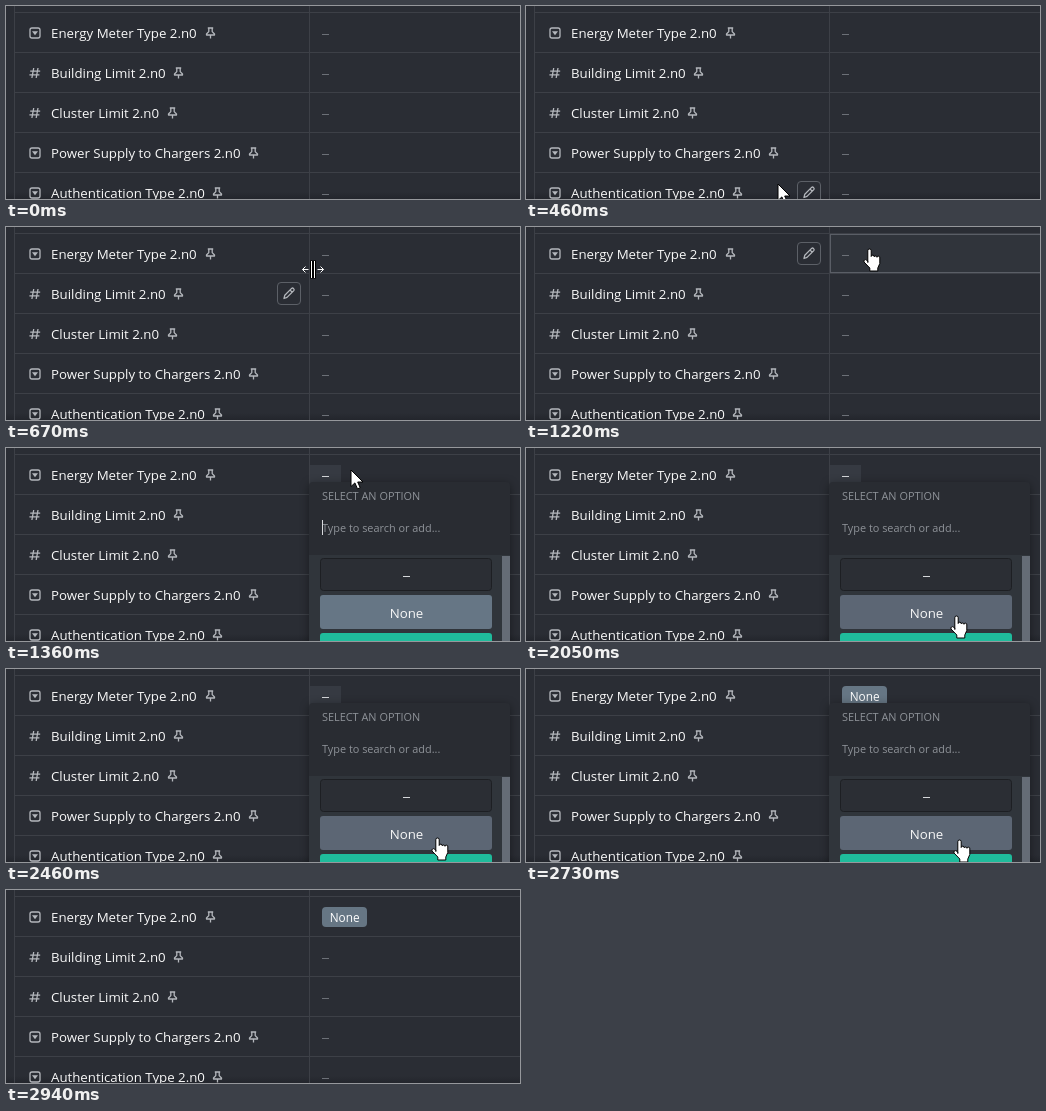
Recreate the animation shown at these times as an HTML page. Size 514x193 px, loop 4020 ms.

```html
<!DOCTYPE html>
<html lang="en">
<head>
<meta charset="utf-8">
<style>
  html, body { margin: 0; width: 100%; height: 100%; overflow: hidden; background: #2a2d34; }
  svg { display: block; width: 514px; height: 193px; }
  text { font: 13.27px "Open Sans", "Noto Sans", sans-serif; fill: #f8f8f8; }
  .small { font-size: 10.9px; fill: #8e9298; }
  .line { stroke: #3d4047; fill: none; }
  .icon { stroke: #b4b7bc; fill: none; stroke-width: 1.3; stroke-linejoin: round; }
  .dash { stroke: #6c7077; }
  .cursor { fill: #fff; stroke: #000; stroke-linejoin: round; }
  #popup { filter: drop-shadow(0 2px 5px rgba(0, 0, 0, .4)); }
</style>
</head>
<body>
<svg id="stage" viewBox="0 0 514 193">
  <defs>
    <linearGradient id="fade" x2="0" y2="1">
      <stop stop-color="#1c1e24" stop-opacity="0"/>
      <stop offset="1" stop-color="#1c1e24" stop-opacity=".5"/>
    </linearGradient>
  </defs>
  <rect y="186" width="514" height="7" fill="url(#fade)"/>
  <g id="table"></g>

  <g id="hover">
    <rect id="valueHover" x="304.5" y=".5" width="215" height="38" fill="#30343b" stroke="#5a5e66"/>
    <path id="hoverDash" class="dash" d="M316 21.5h7"/>
    <rect x="271.5" y="8.5" width="23" height="22" rx="3.5" fill="none" stroke="#5c6067"/>
    <path class="icon" d="M278 24.5l.8-3.3 6.8-6.8q1-.8 2 .2t.2 2l-6.8 6.8zM284 16l2.4 2.4"/>
  </g>

  <g id="activeCell">
    <rect x="304" y="17" width="31" height="20" fill="#363a42"/>
    <path d="M316 28.5h7" stroke="#d5d7da"/>
  </g>
  <g id="pill">
    <rect x="316" y="17" width="45" height="20" rx="4" fill="#667684"/>
    <text x="323.7" y="31.5" style="font-size:11.8px;font-weight:500;fill:#fff">None</text>
  </g>

  <g id="popup">
    <rect x="303" y="34" width="201" height="170" rx="4" fill="#292c32"/>
    <rect x="303" y="107" width="201" height="90" fill="#30353b"/>
    <rect x="496" y="108" width="8" height="90" fill="#656c76"/>
    <text class="small" x="316" y="52">SELECT AN OPTION</text>
    <text class="small" x="316" y="84">Type to search or add...</text>
    <path id="caret" d="M316.5 72v15" stroke="#d8dadd"/>
    <rect id="optionEmpty" x="314.5" y="110.5" width="171" height="32" rx="3" stroke="#1d1f23"/>
    <path d="M397 128.5h7" stroke="#d5d7da"/>
    <rect id="optionNone" x="314" y="147" width="172" height="34" rx="3"/>
    <text x="400.5" y="170" text-anchor="middle">None</text>
    <rect x="314" y="185" width="172" height="20" rx="3" fill="#1fbc9c"/>
  </g>

  <g id="cursor">
    <path id="arrow" class="cursor" d="M0 0V16.5l3.9-3.6 2.6 6 2.7-1.2-2.5-5.7H12z"/>
    <path id="hand" class="cursor" transform="translate(-8.2 -.5)" d="M5 14V2.2a1.7 1.7 0 0 1 3.4 0V8a1.5 1.5 0 0 1 3 .3a1.5 1.5 0 0 1 2.8.5a1.4 1.4 0 0 1 2.8.6V15l-2 4.5v3H7v-3L1.2 13.5a1.7 1.7 0 0 1 2.6-2L5 13z"/>
    <g id="resize" fill="none">
      <path d="M-.5-8.5v18M2.5-8.5v18" stroke="#000" stroke-width="3"/>
      <path d="M-.5-8v17M2.5-8v17M-9.5.5h6M5.5.5h6M-6.5-2.5l-3 3 3 3M8.5-2.5l3 3-3 3" stroke="#fff"/>
    </g>
  </g>
</svg>
<script>
const LOOP = 4020, ROW = 40, TOP = 7;
const OPEN = 1290, PICKED = 2600, CLOSED = 2800, LEAVE = 2940;
const HOVER_LAG = 60;
const $ = id => document.getElementById(id);
const show = (id, on) => $(id).style.display = on ? "" : "none";

const rows = [
  ["Energy Meter Type 2.n0", "select", 204.5],
  ["Building Limit 2.n0", "number", 172.5],
  ["Cluster Limit 2.n0", "number", 166.5],
  ["Power Supply to Chargers 2.n0", "select", 247.5],
  ["Authentication Type 2.n0", "select", 211.5]
];
const icons = {
  select: `<rect class="icon" x="24" y="15" width="10" height="10" rx="2"/>
    <path d="M26 18.3h6l-3 4z" fill="#b4b7bc"/>`,
  number: `<path class="icon" d="M27.7 15l-1.8 10M32 15l-1.8 10M24.2 18.2h10M23.4 21.8h10"/>`
};
const pin = "M-2.7-5h5.4M-1.7-5v3.6L-4 1v1h8v-1L1.7-1.4v-3.6M0 2v3.5";

$("table").innerHTML = rows.map(([label, type, pinX], i) => `
  <g transform="translate(0 ${TOP + i * ROW})">
    <path class="line" d="M8-.5h506"/>
    ${icons[type]}
    <text x="45" y="25">${label}</text>
    <path class="icon" transform="translate(${pinX} 20)" d="${pin}"/>
    <path class="dash" ${i ? "" : 'id="firstDash"'} d="M316 21.5h7"/>
  </g>`).join("") + `<path class="line" d="M8.5 0v193M303.5 0v193"/>`;

// Pointer moves: start time, end time, number of steps, from, to
const moves = [
  [400, 670, 4, [252, 178], [306, 42]],
  [670, 820, 2, [306, 42], [345, 24]],
  [1025, 1220, 3, [345, 24], [345, 22]],
  [1560, 2050, 7, [346, 22], [432, 168]],
  [2320, 2730, 6, [432, 168], [435, 171]],
  [2730, 2870, 2, [435, 171], [437, 180]]
];

function pointerAt(t) {
  if (t < moves[0][0] || t >= LEAVE) return null;
  const [start, end, steps, from, to] = moves.filter(m => m[0] <= t).pop();
  const p = Math.min(1, Math.floor((t - start) / (end - start) * steps + 1e-6) / steps);
  const eased = steps === 7 ? p * p * (3 - 2 * p) : p;
  return from.map((v, i) => v + (to[i] - v) * eased);
}

function cursorKind([x, y], open) {
  if (open) return y > 108 ? "hand" : "arrow";
  if (Math.abs(x - 306) < 6) return "resize";
  return x > 303 ? "hand" : "arrow";
}

function draw(t) {
  const open = t >= OPEN && t < CLOSED;
  const picked = t >= PICKED;
  const pointer = pointerAt(t);

  show("popup", open);
  show("activeCell", open && !picked);
  show("pill", picked);
  show("firstDash", !picked);
  show("caret", t < 1840);

  show("cursor", pointer);
  if (pointer) {
    const kind = cursorKind(pointer, open);
    for (const id of ["arrow", "hand", "resize"]) show(id, id === kind);
    $("cursor").setAttribute("transform", `translate(${pointer.map(Math.round)})`);
  }

  // Row highlighting trails the pointer by about one step
  const trail = pointer && !open && pointerAt(t - HOVER_LAG);
  show("hover", trail);
  if (trail) {
    const row = Math.floor((trail[1] - TOP) / ROW);
    $("hover").setAttribute("transform", `translate(0 ${TOP + row * ROW})`);
    show("valueHover", trail[0] > 312);
    show("hoverDash", trail[0] > 312);
  }

  const y = pointer ? pointer[1] : 0;
  $("optionEmpty").setAttribute("fill", y > 110 && y < 144 ? "#34383f" : "#2b2e34");
  $("optionNone").setAttribute("fill", y > 146 ? "#5c6674" : "#667685");
}

const began = performance.now();
function tick() {
  draw((performance.now() - began) % LOOP);
  requestAnimationFrame(tick);
}
tick();
</script>
</body>
</html>
```
